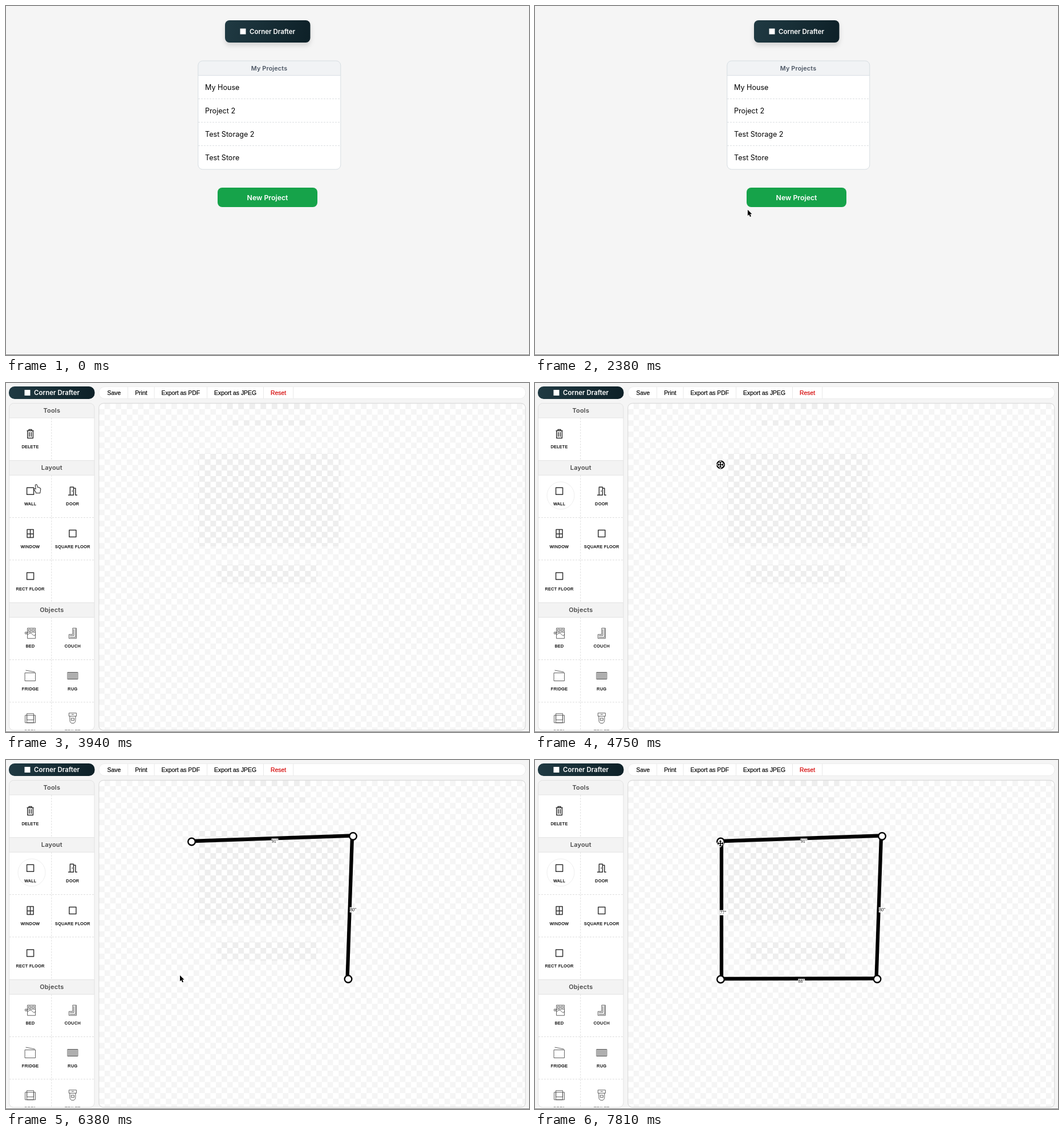
Write an HTML page with a canvas that moves like this. It is 917 by 611 pixels and loops after 8 s.

```html
<!DOCTYPE html>
<html lang="en">
<head>
<meta charset="utf-8">
<title>Corner Drafter</title>
<style>
html, body { margin: 0; width: 100%; height: 100%; overflow: hidden; background: #f5f5f5; }
canvas { display: block; width: 917px; height: 611px; }
</style>
</head>
<body>
<canvas id="stage"></canvas>
<script>
const W = 917, H = 611, LOOP = 8000, STEP = 62.5;
const canvas = document.getElementById('stage');
const c = canvas.getContext('2d');
const dpr = window.devicePixelRatio || 1;
canvas.width = W * dpr;
canvas.height = H * dpr;

const INTER = 'Inter, sans-serif';
const ARIAL = '"Liberation Sans", Arial, sans-serif';
const SERIF = '"Liberation Serif", "Times New Roman", serif';
const BRAND = 'Corner Drafter';

// Times of the hard changes
const AT = { status: 2875, editor: 3125, ripple: 4125, close: 7687 };
const BUTTON = { x: 371, y: 318, w: 175, h: 34 };

// Room corners with the time each is clicked
const CORNERS = [
  { x: 325.5, y: 143, at: 4687 },
  { x: 608.5, y: 133.5, at: 5375 },
  { x: 600, y: 383.5, at: 5937 },
  { x: 325.5, y: 384, at: 6812 }
];
const PX_PER_INCH = 3.12;

// Pointer moves: start, end, x, y, sideways bend
const ENTRY = { t: 1250, x: 306, y: 3 };
const MOVES = [
  [1187, 1812, 222, 250, 30],
  [1937, 2812, 434, 342, 60],
  [3437, 3937, 53, 178, 205],
  [3937, 4125, 51, 195, 0],
  [4250, 4625, 325, 143, 0],
  [4750, 5187, 613, 118, 0],
  [5187, 5562, 608, 143, 0],
  [5562, 5875, 600, 384, 0],
  [6000, 6375, 305, 377, 0],
  [6375, 6687, 323, 385, 0],
  [6875, 7500, 325, 140, -15],
  [7500, 7812, 325, 146, 0]
];

function box(x, y, w, h, r, fill, stroke, lw = 1) {
  c.beginPath();
  c.roundRect(x, y, w, h, r);
  if (fill) { c.fillStyle = fill; c.fill(); }
  if (stroke) { c.strokeStyle = stroke; c.lineWidth = lw; c.stroke(); }
}

function text(s, x, y, font, color, align = 'center', spacing = 0, weight = 0) {
  c.font = font;
  c.fillStyle = c.strokeStyle = color;
  c.textAlign = align;
  c.letterSpacing = spacing + 'px';
  c.fillText(s, x, y);
  if (weight) {
    c.lineWidth = weight;
    c.strokeText(s, x, y);
  }
}

function line(x1, y1, x2, y2, color, lw = 1, dash = []) {
  c.beginPath();
  c.moveTo(x1, y1);
  c.lineTo(x2, y2);
  c.strokeStyle = color;
  c.lineWidth = lw;
  c.setLineDash(dash);
  c.stroke();
  c.setLineDash([]);
}

function circle(x, y, r, fill, stroke, lw) {
  box(x - r, y - r, 2 * r, 2 * r, r, fill, stroke, lw);
}

function brand(x, y, w, h, r, textX, shadow) {
  const g = c.createLinearGradient(x, y, x + w, y + h);
  g.addColorStop(0, '#203a43');
  g.addColorStop(1, '#0d2027');
  c.save();
  if (shadow) {
    c.shadowColor = 'rgba(0,0,0,.14)';
    c.shadowBlur = 9 * dpr;
    c.shadowOffsetY = 5 * dpr;
  }
  box(x, y, w, h, r, g);
  c.restore();
  const mid = y + h / 2;
  box(textX - 16.5, mid - 5, 10, 10, 0, '#fff');
  text(BRAND, textX, mid + 4.3, '600 11.5px ' + INTER, '#fff', 'left');
}

function drawHome(t) {
  brand(384, 25, 149.5, 39, 8, 427, true);

  box(337, 96, 250, 190, 8, '#fff');
  box(337, 96, 250, 25.5, [8, 8, 0, 0], '#f1f3f5');
  line(337, 121.5, 587, 121.5, '#d9dfe4');
  text('My Projects', 461.5, 112.5, '600 10.8px ' + INTER, '#4b5563', 'center', 0.15);
  ['My House', 'Project 2', 'Test Storage 2', 'Test Store'].forEach((name, i) => {
    const y = 146.7 + i * 41;
    text(name, 349, y, '400 12.6px ' + INTER, '#000', 'left');
    if (i < 3) line(337, y + 15.8, 587, y + 15.8, '#dcdfe2', 1, [3, 2]);
  });
  box(336.8, 96, 250, 190, 8, null, '#d6dde2');

  const { x, y, w, h } = BUTTON, p = pointer(t);
  const hover = p.x > x && p.x < x + w && p.y > y && p.y < y + h;
  box(x, y, w, h, 8, hover ? '#15803d' : '#16a34a');
  text('New Project', x + w / 2, 339.6, '600 12.3px ' + INTER, '#fff');

  if (t >= AT.status) {
    box(-1, 598.5, 97, 14, [0, 4, 0, 0], '#dcdedf', '#cfd1d2');
    text('localhost:3000/new', 3, 610, '400 9.2px ' + INTER, '#666', 'left');
  }
}

// Icon outlines around the middle of a cell
const SQUARE = 'M-6 -6H6V6H-6Z';
const ICONS = {
  DELETE: 'M-6 -5.5H6M-2.5 -5.5V-7.5H2.5V-5.5M-4.8 -5.5V7.5H4.8V-5.5M-1.7 -3V5M1.7 -3V5',
  WALL: SQUARE,
  DOOR: 'M-8 7H-4.5V-7H1.5V7H-4.5M1.5 -5H5V7H8M-.8 -.8V.8',
  WINDOW: 'M-5.5 -7H5.5V7H-5.5ZM0 -7V7M-5.5 .6H5.5',
  'SQUARE FLOOR': SQUARE,
  'RECT FLOOR': SQUARE,
  BED: 'M-5 -9H9V9H-5ZM-3 -7H1V-4H-3ZM3 -7H7V-4H3ZM-5 -2H9M-5 3Q0 -3 4 2T9 1M-9 -2H-6V1H-9Z',
  COUCH: 'M0 -9H6.5V9H-6.5V2H0ZM2 -7V4H-5M5 -8V7H-5',
  FRIDGE: 'M-9.5 -5H9V9H-9.5ZM-8 -9.5L8 -6.5',
  RUG: 'M-9 -6H9V6H-9Z' + Array.from({ length: 8 }, (_, i) => `M${2 * i - 7} -6V6`).join(''),
  SOFA: 'M-6 -8H6V3H-6ZM-9 -5H-6V8H6V-5H9V8H-9ZM-6 -5H6',
  TOILET: 'M-6.5 -9H6.5V-3.5H-6.5ZM-5 -3.5V3Q-5 9 0 9T5 3V-3.5M-2 -6.5H2M-2.5 0H2.5V4H-2.5Z'
};

const SECTIONS = {
  Tools: [['DELETE']],
  Layout: [['WALL', 'DOOR'], ['WINDOW', 'SQUARE FLOOR'], ['RECT FLOOR']],
  Objects: [['BED', 'COUCH'], ['FRIDGE', 'RUG'], ['SOFA', 'TOILET']]
};

function drawCell(name, x, y, thin) {
  c.save();
  c.translate(x, y + 28);
  c.strokeStyle = thin ? '#444' : '#333';
  c.lineWidth = thin ? 0.85 : 1.5;
  c.lineJoin = 'round';
  c.stroke(new Path2D(ICONS[name]));
  c.restore();
  text(name, x, y + 53, '400 7.1px ' + ARIAL, '#000', 'center', 0.45, 0.25);
}

function drawSidebar(t) {
  const cell = 74.3, head = 26;
  let y = 35;
  c.save();
  box(5.5, 35.5, 149.5, 572.5, 8, '#fff');
  c.clip();
  for (const [title, rows] of Object.entries(SECTIONS)) {
    c.fillStyle = '#f3f3f3';
    c.fillRect(5, y, 151, head);
    line(5, y + 0.5, 156, y + 0.5, '#e3e3e3');
    line(5, y + head, 156, y + head, '#e3e3e3');
    text(title, 80.3, y + 17, '600 11px ' + INTER, '#4a4a4a', 'center', 0.2);
    y += head;
    rows.forEach((row, i) => {
      if (i) line(6, y, 155, y, '#dedede', 1, [3, 2]);
      line(79.8, y, 79.8, y + cell, '#dedede', 1, [3, 2]);
      row.forEach((name, col) => drawCell(name, 42.6 + col * cell, y, title === 'Objects'));
      y += cell;
    });
  }
  if (t >= AT.ripple) circle(45, 197, 24, null, '#eee', 1);
  c.restore();
  box(5.5, 35.5, 149.5, 572.5, 8, null, '#e2e2e2');
}

function checker(color) {
  const s = 9.77;
  c.fillStyle = color;
  for (let r = 0; r < 59; r++)
    for (let k = (r + 1) % 2; k < 77; k += 2) c.fillRect(163 + k * s, 36 + r * s, s, s);
}

function drawBoard() {
  c.save();
  box(163, 35.5, 748, 572.5, 8, '#fff');
  c.clip();
  checker('#f5f5f5');
  // Stronger squares where the first page's panels stood
  c.beginPath();
  c.rect(387, 36, 146, 10);
  c.rect(387, 65, 146, 9);
  c.rect(337, 123, 250, 163);
  c.rect(BUTTON.x, BUTTON.y, BUTTON.w, BUTTON.h);
  c.clip();
  checker('#eee');
  c.restore();
  box(162.8, 35.5, 748, 572.5, 8, null, '#ddd', 1.3);
}

function drawToolbar() {
  const pad = 12.5, font = '400 10.4px ' + ARIAL;
  brand(5, 6, 150.5, 22, 10, 49);
  box(163, 6.5, 748, 21, 10, '#fff', '#ececec');
  let x = 165;
  for (const s of ['Save', 'Print', 'Export as PDF', 'Export as JPEG', 'Reset']) {
    text(s, x + pad, 20.7, font, s === 'Reset' ? '#d40000' : '#000', 'left', 0, 0.2);
    x += c.measureText(s).width + 2 * pad;
    line(x, 7, x, 27, '#e8e8e8');
  }
}

function drawPlan(t) {
  const walls = CORNERS.map((a, i) => {
    const b = CORNERS[i + 1] || CORNERS[0];
    return { a, b, at: i < 3 ? b.at : AT.close };
  }).filter(w => t >= w.at);
  const inset = x => x + Math.sign(460 - x) * 1.5;
  for (const { a, b } of walls) line(inset(a.x), a.y - 1, inset(b.x), b.y - 1, '#000', 6.3);
  for (const { a, b } of walls) {
    const x = (a.x + b.x) / 2 + 4.5, y = (a.y + b.y) / 2 + 3.8;
    const inches = Math.round(Math.hypot(b.x - a.x, b.y - a.y) / PX_PER_INCH);
    c.fillStyle = '#fff';
    c.fillRect(x - 6, y - 4.5, 12, 9);
    text(inches + '"', x, y + 2.8, '400 8px ' + SERIF, '#000');
  }
  for (const { x, y, at } of CORNERS) if (t >= at) circle(x, y, 6.3, '#fff', '#000', 2.4);
}

function pointer(t) {
  let { x, y } = ENTRY;
  for (const [from, to, tx, ty, bend] of MOVES) {
    if (t < from) break;
    const u = 1 - (1 - Math.min(1, (t - from) / (to - from))) ** 2.2;
    const dx = tx - x, dy = ty - y;
    const side = bend * Math.sin(Math.PI * u) / Math.hypot(dx, dy);
    x += dx * u - dy * side;
    y += dy * u + dx * side;
  }
  return { x, y };
}

const ARROW = new Path2D('M0 0V11.6L2.6 9.2L4.5 13.6L6.7 12.7L4.8 8.4H8.3Z');
const BARB = 'M-.8 0V-3H-2.4L0 -5.8L2.4 -3H.8V0Z';
const MOVE = new Path2D();
for (let a = 0; a < 360; a += 90) MOVE.addPath(new Path2D(BARB), new DOMMatrix().rotate(a));
const HAND = new Path2D('M-1.2 1Q0 -.8 1.1 1L1.8 5Q4 4 5.8 6.2Q7.4 6 7.3 8L6.3 14.2H-.2V12.4L-3.6 8.2Q-3.4 6.6 -.2 8.6ZM2 9V12M4 9V12');

function drawPointer(t) {
  if (t < ENTRY.t) return;
  const { x, y } = pointer(t);
  const onRing = CORNERS.some(p => t >= p.at && Math.hypot(x - p.x, y - p.y) < 10);
  const onCell = t >= AT.editor && x < 155 && y > 61;
  const shape = onCell ? HAND : onRing ? MOVE : ARROW;
  c.save();
  c.translate(x, y);
  if (shape === ARROW) c.scale(0.9, 0.9);
  c.lineJoin = 'round';
  c.strokeStyle = onCell ? '#222' : '#fff';
  c.lineWidth = onCell ? 2 : 1.8;
  c.stroke(shape);
  c.fillStyle = onCell ? '#fff' : '#000';
  c.fill(shape);
  c.restore();
}

function draw(t) {
  c.setTransform(dpr, 0, 0, dpr, 0, 0);
  c.fillStyle = '#f5f5f5';
  c.fillRect(0, 0, W, H);
  if (t < AT.editor) {
    drawHome(t);
  } else {
    drawToolbar();
    drawSidebar(t);
    drawBoard();
    drawPlan(t);
  }
  drawPointer(t);
  c.fillStyle = '#858585';
  c.fillRect(0, 610, W, 1);
}

const start = performance.now();
function tick() {
  const t = (performance.now() - start) % LOOP;
  draw(Math.floor((t + 5) / STEP) * STEP);
  requestAnimationFrame(tick);
}
tick();
</script>
</body>
</html>
```
